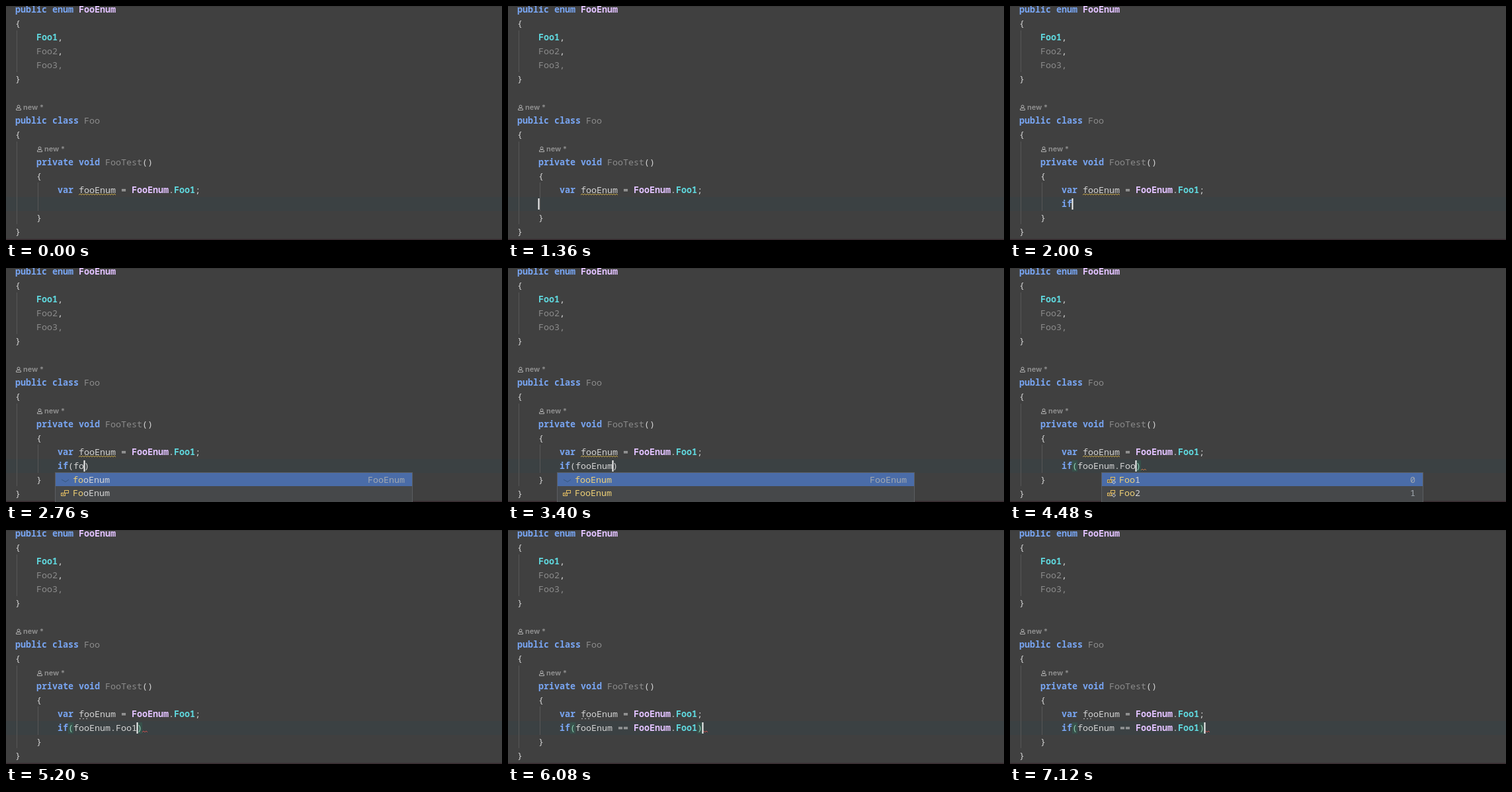
Recreate the animation shown at these times as an HTML page. Size 750 by 354 pixels, loop 7.16 s.

```html
<!DOCTYPE html>
<html lang="en">
<head>
<meta charset="utf-8">
<title>Enum completion</title>
<style>
html, body { margin: 0; width: 100%; height: 100%; overflow: hidden; background: #404040; }
svg { display: block; width: 750px; height: 354px; }
text { font: 13.333px "Noto Sans Mono", "DejaVu Sans Mono", monospace; fill: #d4d4d4; white-space: pre; }
.kw { fill: #78a5f2; font-weight: 600; }
.type { fill: #e2c2ff; font-weight: 600; }
.member { fill: #5fd6dc; font-weight: 700; }
.dim { fill: #8b8b8b; }
.match { fill: #eed076; font-weight: 500; }
.paren { fill: #8fd0b4; }
.hint { font: 600 11px Inter, "Open Sans", sans-serif; fill: #929292; }
.side { fill: #a2a8b0; text-anchor: end; }
path { fill: none; }
</style>
</head>
<body>
<svg viewBox="0 0 750 354"><g id="page"></g><g id="live"></g></svg>
<script>
const LOOP = 7160, CH = 8, BASE = 304;
const page = document.getElementById('page'), live = document.getElementById('live');

const text = (x, y, s, cls = '') => `<text x="${x}" y="${y}" class="${cls}">${s}</text>`;
const rect = (x, y, w, h, fill, more = '') =>
  `<rect x="${x}" y="${y}" width="${w}" height="${h}" fill="${fill}" ${more}/>`;
const path = (d, stroke, more = '') => `<path d="${d}" stroke="${stroke}" ${more}/>`;

// Lays out [string, class] pairs on the character grid
function line(x, y, ...parts) {
  let out = '';
  for (const [s, cls] of parts) {
    out += text(x, y, s, cls);
    x += s.length * CH;
  }
  return out;
}

function wave(x, y, width, color) {
  return path(`M${x} ${y}` + 'l2 -2l2 2'.repeat(width / 4), color);
}

function hint(x, y) {
  const person = `<circle cx="${x + 4}" cy="${y - 5}" r="2" fill="none" stroke="#b0b0b0"/>` +
    path(`M${x + .5} ${y + .5}v-1.5q0 -1.5 2 -1.5h3q2 0 2 1.5v1.5z`, '#b0b0b0');
  return person + text(x + 11, y, 'new *', 'hint');
}

page.innerHTML =
  rect(0, 0, 750, 354, '#404040') +
  rect(0, 0, 750, 1, '#393939') +
  rect(0, 289, 750, 21, '#3b4143') +
  rect(0, 352.5, 750, 1.5, '#382b30') +
  rect(16, 37, 1, 63, '#575757') +
  rect(16, 205, 1, 125, '#575757') +
  rect(48, 267, 1, 43, '#575757') +
  line(14, 10, ['public enum ', 'kw'], ['FooEnum', 'type']) +
  text(14, 31, '{') +
  line(46, 52, ['Foo1', 'member'], [',']) +
  line(46, 73, ['Foo2', 'dim'], [',']) +
  text(46, 94, 'Foo3,', 'dim') +
  text(14, 115, '}') +
  hint(15, 157) +
  line(14, 178, ['public class ', 'kw'], ['Foo', 'dim']) +
  text(14, 199, '{') +
  hint(47, 220) +
  line(46, 241, ['private void ', 'kw'], ['FooTest', 'dim'], ['()']) +
  text(46, 262, '{') +
  line(78, 283, ['var ', 'kw'], ['fooEnum = '], ['FooEnum', 'type'], ['.'], ['Foo1', 'member'], [';']) +
  text(46, 325, '}') +
  text(14, 346, '}');

const typed = 'if(fooEnum.Foo1';
const keyTimes = [1760, 1900, 2280, 2480, 2640, 2780, 2920, 3060, 3200, 3340,
  3560, 3960, 4120, 4280, 5120];
const EXPAND = 5600;
const hidden = [[0, 200], [700, 1200], [4800, 5120], [6120, 6640]];

const icons = {
  key: () => '',
  local: (x, y) =>
    `<path d="M${x} ${y + 4}l5 -4l7 4v3l-5 4l-7 -4z" fill="#8fc4ef"/>` +
    path(`M${x + 1} ${y + 5}l6 3.5l5 -3.5`, '#36567f'),
  type: (x, y) =>
    rect(x + 5.5, y + 1.5, 6, 4, 'none', 'stroke="#e3bd62"') +
    rect(x + .5, y + 5.5, 6, 4, '#46484a', 'stroke="#e3bd62"') +
    rect(x + 2, y + 7, 3, 1, '#e3bd62'),
  member: (x, y) => icons.type(x, y) + path(`M${x + 10} ${y + 6.5}l2.5 2.5l-2.5 2.5l-2.5 -2.5z`, '#e2e2e2')
};

// Rows are [icon, label, side note]
function popup(x, width, matched, rows) {
  let out = rect(x + .5, 309.5, width - 1, 60, '#46484a', 'stroke="#5b5e61"') +
    rect(x + 1, 310, width - 2, 20, '#4a6ca8');
  rows.forEach(([icon, label, side], i) => {
    const y = 325 + 20 * i;
    out += icons[icon](x + 9, y - 10) +
      line(x + 27, y, [label.slice(0, matched), 'match'], [label.slice(matched)]);
    if (side) out += text(x + width - 12, y, side, 'side');
  });
  return out;
}

function popupAt(t, n) {
  if (t >= 2080 && t < 2280) return popup(51, 541, 2, [['key', 'if'], ['key', 'ifdef']]);
  if (t >= 2560 && t < 3560)
    return popup(74, 541, n - 3, [['local', 'fooEnum', 'FooEnum'], ['type', 'FooEnum']]);
  if (t >= 3680 && t < 5120)
    return popup(138, 487, n - 11, [['member', 'Foo1', '0'], ['member', 'Foo2', '1']]);
  return '';
}

function condition(t, n) {
  const done = t >= EXPAND, lit = t >= 3700;
  const closeX = done ? 286 : 78 + n * CH;
  const parenClass = lit ? 'paren' : '';
  let out = line(78, BASE, [typed.slice(0, Math.min(n, 2)), n > 1 ? 'kw' : '']);
  if (n < 3) return out;
  if (lit) out += rect(94, 291, 8, 17, '#36504a') + rect(closeX, 291, 8, 17, '#36504a');
  out += text(94, BASE, '(', parenClass);
  out += done
    ? line(102, BASE, ['fooEnum == '], ['FooEnum', 'type'], ['.'], ['Foo1', 'member'])
    : text(102, BASE, typed.slice(3, n));
  out += text(closeX, BASE, ')', parenClass);
  if (lit) out += wave(closeX + 8, 306, 8, t < 5120 ? '#b9774a' : '#c5504d');
  return out;
}

function scene(t) {
  const n = keyTimes.filter(k => k <= t).length;
  const caretX = t >= EXPAND ? 294 : n ? 78 + n * CH : 46;
  const caretOn = !hidden.some(([from, to]) => t >= from && t < to);
  const underline = t < 5120
    ? wave(110, 286, 56, '#c0a347')
    : path('M111 285.5h14', '#b8b8b8', 'stroke-dasharray="2 3"');
  return underline + condition(t, n) +
    (caretOn ? rect(caretX - .5, 291, 2, 17, '#f4f4f4') : '') + popupAt(t, n);
}

let shown;
function tick() {
  const next = scene(performance.now() % LOOP);
  if (next !== shown) live.innerHTML = shown = next;
  requestAnimationFrame(tick);
}
tick();
</script>
</body>
</html>
```
